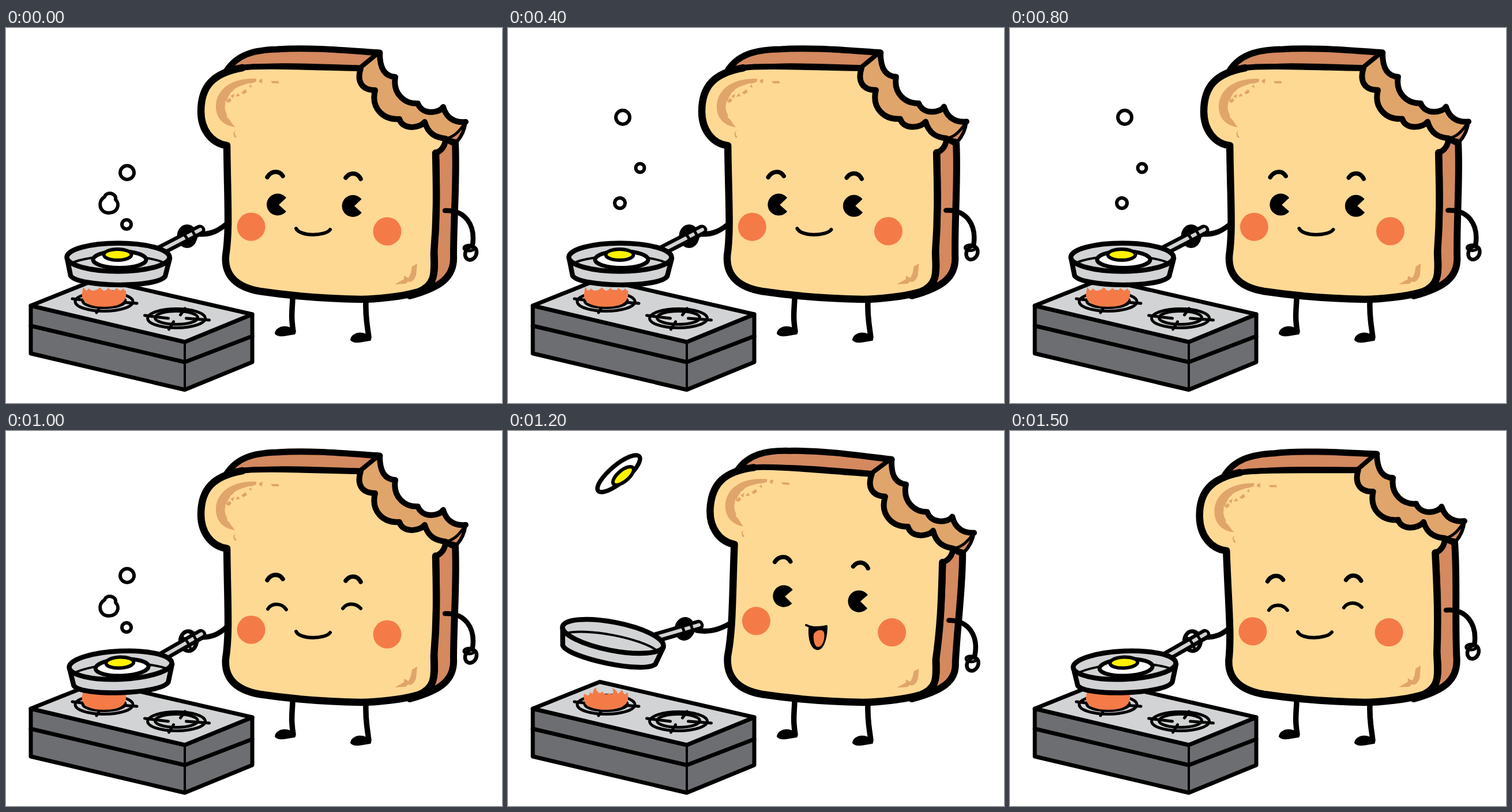
An HTML page that plays this animation: 860x651 px, repeating every 1600 ms.

```html
<!DOCTYPE html>
<html lang="en">
<head>
<meta charset="utf-8">
<title>Toast frying an egg</title>
<style>
  html, body { margin: 0; width: 100%; height: 100%; overflow: hidden; background: #fff; }
  svg { display: block; width: 100vw; height: 100vh; }
  .ink { fill: none; stroke: #000; stroke-linecap: round; stroke-linejoin: round; }
</style>
</head>
<body>
<svg viewBox="0 0 860 651">
  <!-- stove -->
  <g class="ink" stroke-width="7">
    <path fill="#6d6e71" d="M43 482L310 545L427 497V580L310 628L43 565Z"/>
    <path fill="#d1d3d4" d="M43 482L159 435.500L427 497L310 545Z"/>
    <path d="M43 517L310 580L427 535"/>
    <path stroke-width="4" d="M310 545V628"/>
  </g>
  <defs>
    <g id="burner" class="ink" stroke-width="5">
      <ellipse rx="50" ry="16.500"/>
      <ellipse cy="-1" rx="37" ry="11.500"/>
      <path d="M-55-5L-14 0M57 3L17 0M15-17L7-6M-13 19L-5 6"/>
    </g>
  </defs>
  <use href="#burner" x="295.500" y="504"/>
  <use href="#burner" x="170" y="475"/>
  <path id="flame" fill="#f47b48"/>

  <!-- legs -->
  <g class="ink" stroke-width="9.500">
    <path d="M497 470C496 494 494 500 498 527M624 476C623 502 626 512 629 537"/>
    <g stroke-width="4" fill="#000">
      <path id="foot" d="M500 529C492 515 470 518 468 530C474 536 484 532 500 530Z"/>
      <use href="#foot" x="131" y="11"/>
    </g>
  </g>

  <path id="arm" class="ink" stroke-width="9"/>

  <!-- bread -->
  <g class="ink">
    <path data-warp fill="#d4895f" stroke-width="11" d="M382 75C400 46 430 38 470 37C530 33 590 39 648 43L615 70C540 68 460 62 385 74Z"/>
    <path data-warp fill="#d4895f" stroke-width="12" d="M779 200C782 260 776 330 776 395C778 432 755 450 700 465L738 440C746 420 742 395 742 380C748 320 746 260 745 217L762 192Z"/>
    <path data-warp fill="#d4895f" stroke-width="6" d="M797 163C795 178 790 188 782 197L762 192Z"/>
    <path data-warp fill="#e0a56a" stroke="none" d="M615 70L648 43C648 68 655 84 675 85C670 115 692 132 714 131C722 152 752 148 758 137C764 158 780 165 797 163C791 180 779 185 762 192L726 185L682 180L635 140L605 90Z"/>
    <path data-warp fill="#fed994" stroke="none" d="M615 70C608 92 616 108 640 108C632 140 655 160 682 158C688 178 718 174 726 163C732 184 745 190 762 192C762 205 754 214 745 217C746 270 748 320 742 390C742 420 748 445 715 458C690 466 640 471 615 471C560 470 500 466 440 457C400 450 378 430 381 395C388 350 384 300 383 204C355 200 338 175 338 145C338 100 360 78 410 69C440 64 540 69 615 70Z"/>
    <path data-warp stroke-width="10" d="M410 69C440 64 540 69 615 70C608 92 616 108 640 108C632 140 655 160 682 158C688 178 718 174 726 163C732 184 745 190 762 192C762 205 754 214 745 217"/>
    <path data-warp stroke-width="12.500" d="M745 217C746 270 748 320 742 390C742 420 748 445 715 458C690 466 640 471 615 471C560 470 500 466 440 457C400 450 378 430 381 395C388 350 384 300 383 204C355 200 338 175 338 145C338 100 360 78 410 69"/>
    <path data-warp stroke-width="10" d="M648 43C648 68 655 84 675 85C670 115 692 132 714 131C722 152 752 148 758 137C764 158 780 165 797 163"/>
    <path data-warp stroke-width="5" d="M615 70L648 43M762 192C776 190 786 180 797 163"/>
  </g>

  <!-- toasted patches -->
  <g fill="#e0a56a">
    <path data-warp d="M434 88C390 86 362 108 364 140C366 160 380 170 397 172C390 164 388 158 383 155C385 150 380 147 380 141C378 135 382 132 380 127C386 125 383 120 388 116C389 110 394 111 395 107C402 101 412 99 420 96C426 97 430 94 434 93Z"/>
    <path data-warp d="M439 90L445 88L444 96L439 94ZM459 92L472 92L474 96L462 96ZM398 178L396 183L400 190L396 190L394 182Z"/>
    <path data-warp d="M381 127L388 121L391 126L386 130ZM389 118L396 114L394 122ZM398 119L402 113L406 118ZM408 112L415 106L418 111L412 115ZM421 101L425 98L426 104Z"/>
    <path data-warp d="M713 409L711 429C708 438 702 443 697 440L693 444L674 445L690 436L690 430L698 434L702 425L704 414Z"/>
  </g>

  <!-- face -->
  <g fill="#f47b48">
    <circle data-at="425 345" data-lift="10" cx="425" cy="345" r="24.500"/>
    <circle data-at="661 353" data-lift="10" cx="661" cy="353" r="24.500"/>
  </g>
  <g class="ink" stroke-width="6">
    <path data-at="467 253" data-lift="28" stroke-width="7.500" d="M453 259C460 247 474 247 480 257"/>
    <path data-at="602 256" data-lift="28" stroke-width="7.500" d="M589 260C596 250 609 250 615 262"/>
    <g id="open" stroke="none">
      <g data-at="471 306" data-lift="17">
        <circle cx="471" cy="306.500" r="19" fill="#000"/>
        <path fill="#fed994" d="M473 307L493 288V325Z"/>
      </g>
      <g data-at="602 309" data-lift="17">
        <circle cx="601.500" cy="309" r="19" fill="#000"/>
        <path fill="#fed994" d="M604 309L624 290V327Z"/>
      </g>
    </g>
    <g id="shut">
      <path data-at="470 304" data-lift="17" d="M454 309C461 298 478 298 486 310"/>
      <path data-at="600 304" data-lift="17" d="M584 308C591 298 606 298 615 308"/>
    </g>
    <path id="smile" data-at="532 353" data-lift="0" d="M503 348C509 362 553 362 562 350"/>
    <g id="laugh">
      <path fill="#000" d="M524 343C522 386 549 392 551 341Z"/>
      <path stroke-width="4" d="M517 337Q534 345 552 339"/>
      <path fill="#f47b48" stroke="none" d="M530 353C533 345 546 343 548 350C550 362 545 375 537 375C531 374 529 362 530 353Z"/>
    </g>
  </g>

  <!-- free arm -->
  <g class="ink" stroke-width="8.500" data-at="785 350" data-lift="0">
    <path d="M761 317C796 315 814 342 809 376"/>
    <ellipse cx="806" cy="391" rx="9.500" ry="12" transform="rotate(25 806 391)" fill="#fff" stroke-width="6.500"/>
    <ellipse cx="803" cy="382" rx="9" ry="5" stroke-width="5"/>
  </g>

  <!-- pan -->
  <g id="pan" class="ink" stroke-width="8.500">
    <ellipse id="fist" cx="314" cy="361.500" rx="14" ry="17" stroke-width="7"/>
    <path stroke-width="19" d="M262 389L336 351"/>
    <path stroke="#d1d3d4" stroke-width="6" d="M268 386L337 350"/>
    <path stroke-width="5" d="M302 353Q314 360 318 377M317 346Q326 353 329 365"/>
    <path fill="#d1d3d4" d="M106 400L112 430C125 450 262 452 276 431L284 400Z"/>
    <ellipse cx="194.500" cy="398" rx="89" ry="24.500" fill="#d1d3d4"/>
    <path stroke-width="4" d="M112 409C145 392 243 391 277 409"/>
    <g id="fried">
      <ellipse cx="197" cy="402" rx="46" ry="14.500" fill="#fff" stroke-width="7"/>
      <ellipse cx="193.500" cy="393.500" rx="24" ry="9.500" fill="#fff200" stroke-width="6"/>
    </g>
  </g>

  <g id="egg" class="ink">
    <ellipse rx="46.500" ry="15" fill="#fff" stroke-width="7.500"/>
    <ellipse cx="3.500" cy="8" rx="22" ry="9.500" fill="#fff200" stroke-width="6"/>
  </g>

  <g class="ink" stroke-width="6">
    <g id="low" fill="#fff">
      <circle cx="210" cy="251" r="12"/>
      <path d="M171 293C157 302 163 321 178 321C194 321 198 305 190 298C192 286 174 283 171 293Z"/>
      <circle cx="209" cy="341" r="8"/>
    </g>
    <g id="high" fill="#fff">
      <circle cx="199" cy="155" r="12"/>
      <circle cx="229" cy="243" r="7.500"/>
      <circle cx="194" cy="304" r="9"/>
    </g>
  </g>
</svg>
<script>
const LOOP = 1600;
const el = id => document.getElementById(id);
const show = (id, on) => el(id).setAttribute('display', on ? 'inline' : 'none');

const flames = [
  'M134 449Q137 455 140 456L144 452Q147 456 151 456Q159 455 163 450Q166 455 170 456Q176 455 177 451Q181 455 185 456Q190 455 191 451Q196 455 198 456Q203 454 203 451Q205 456 208 456C210 473 202 484 170 484C140 484 130 473 132 460Z',
  'M132 456Q136 459 139 459Q142 457 142 453Q145 456 147 456Q147 450 152 445Q154 453 159 455Q162 455 163 452Q166 456 169 457Q174 457 174 455Q178 457 181 457Q184 453 181 446Q189 450 190 456Q196 454 196 449Q201 453 201 457Q205 457 207 453Q210 464 206 471C199 487 146 489 134 473Q130 464 132 456Z'
];
const pans = {
  rest: { x: 0, y: 0, turn: 0, arm: 'M386 337C368 353 355 358 337 358' },
  low: { x: 4, y: 8.5, turn: -2.5, arm: 'M384 339C368 354 356 358 339 358' },
  flip: { x: -12.5, y: -41.5, turn: 11, arm: 'M390 331C367 346 347 350 327 346' }
};

// One pose per beat; each is held until the next.
const calm = { lean: 0, sway: 0, flame: 0 };
const idle = { ...calm, lean: -.002, sway: -1.5, pan: 'rest', bubbles: 'low' };
const toss = { lean: .05, sway: 0, pan: 'flip', flame: 1 };
const beats = [
  { ...idle, ...calm, at: 0 },
  { ...idle, at: 200, flame: 1 },
  { ...idle, at: 400, bubbles: 'high' },
  { ...idle, at: 600, flame: 1 },
  { ...idle, at: 800, bubbles: 'high' },
  { ...idle, ...calm, at: 1000, pan: 'low', shut: true },
  { ...toss, at: 1100, egg: [192, 215, 139], flame: 0 },
  { ...toss, at: 1200, egg: [192, 74, -40] },
  { ...toss, at: 1300, egg: [192, 160, -40], flame: 0 },
  { ...toss, at: 1400, egg: [192, 279, 140], lean: .047, drop: 2 },
  { ...calm, at: 1500, lean: -.026, sway: -3, pan: 'low', shut: true }
];

// The bread leans around its belly while its base stays planted.
function warp(x, y, { lean, sway }, rigid) {
  const k = Math.min(1, Math.max(0, (465 - y) / 130));
  const hold = rigid ? 1 : k * k * (3 - 2 * k);
  const a = lean * hold, dx = x - 530, dy = y - 390;
  return [
    530 + dx * Math.cos(a) - dy * Math.sin(a) + sway * hold,
    390 + dx * Math.sin(a) + dy * Math.cos(a)
  ];
}

const skins = [...document.querySelectorAll('[data-warp]')].map(node => ({ node, d: node.getAttribute('d') }));
const parts = [...document.querySelectorAll('[data-at]')].map(node => ({
  node, at: node.dataset.at.split(' ').map(Number), lift: +node.dataset.lift
}));

function draw(p) {
  const tossing = p.pan === 'flip', pan = pans[p.pan];
  for (const { node, d } of skins) {
    node.setAttribute('d', d.replace(/([\d.]+) ([\d.]+)/g, (_, x, y) =>
      warp(+x, +y, p).map(v => v.toFixed(2)).join(' ')));
  }
  for (const { node, at: [x, y], lift } of parts) {
    const [wx, wy] = warp(x, y, p, true);
    const raised = tossing && lift;
    node.setAttribute('transform',
      `translate(${wx + (raised ? 3 : 0)} ${wy - (raised ? lift : 0)}) ` +
      `rotate(${p.lean * 180 / Math.PI}) translate(${-x} ${-y})`);
  }
  el('pan').setAttribute('transform',
    `translate(${pan.x} ${pan.y + (p.drop || 0)}) rotate(${pan.turn} 194.5 398)`);
  el('arm').setAttribute('d', pan.arm);
  el('fist').setAttribute('fill', p.pan === 'low' ? 'none' : '#000');
  el('flame').setAttribute('d', flames[p.flame]);
  if (p.egg) {
    const [x, y, turn] = p.egg;
    el('egg').setAttribute('transform', `translate(${x} ${y}) rotate(${turn})`);
  }
  show('egg', p.egg);
  show('fried', !p.egg);
  show('open', !p.shut);
  show('shut', p.shut);
  show('smile', !tossing);
  show('laugh', tossing);
  show('low', p.bubbles === 'low');
  show('high', p.bubbles === 'high');
}

const start = performance.now();
let current;
function tick() {
  const t = (performance.now() - start) % LOOP;
  const pose = beats.findLast(b => b.at <= t);
  if (pose !== current) draw(current = pose);
  requestAnimationFrame(tick);
}
tick();
</script>
</body>
</html>
```
